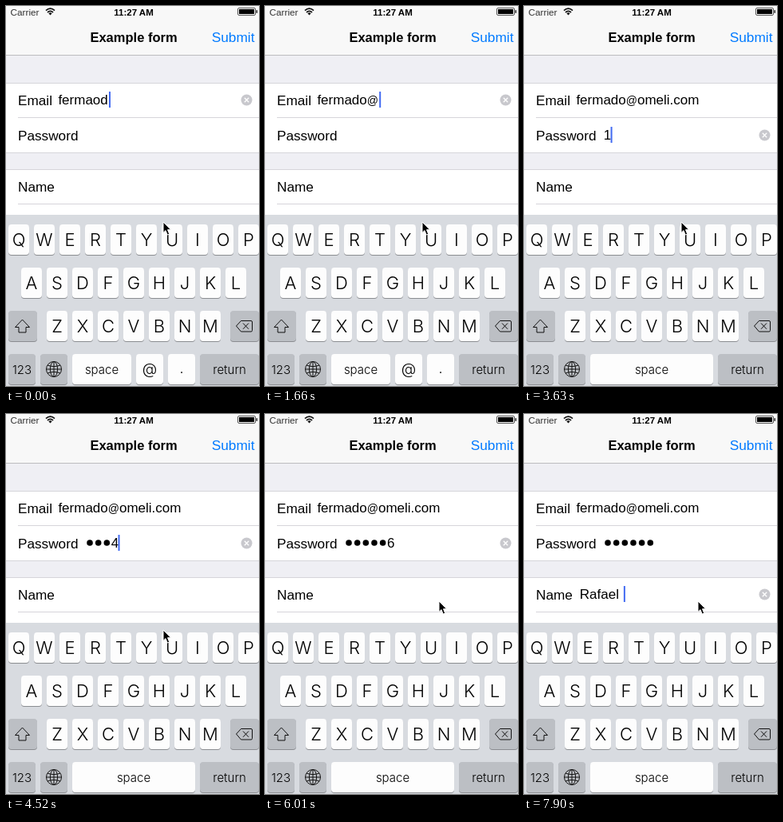
Write an HTML page that moves like this. It is 317 px wide and 475 px high and loops after 8000 ms.

```html
<!DOCTYPE html>
<html lang="en">
<head>
<meta charset="utf-8">
<title>Example form</title>
<style>
html, body { margin: 0; width: 100%; height: 100%; overflow: hidden; background: #fff; }
svg { display: block; width: 317px; height: 475px; }
text { font-family: "Liberation Sans", Arial, sans-serif; font-size: 17px; white-space: pre; }
.label { font-size: 17.2px; }
.key { font: 300 22px Inter, "Liberation Sans", sans-serif; text-anchor: middle; }
.word { font-size: 15px; }
.line { fill: none; stroke: #111; stroke-width: 1; stroke-linejoin: round; }
</style>
</head>
<body>
<svg id="stage" viewBox="0 0 317 475" xmlns="http://www.w3.org/2000/svg"></svg>
<script>
const LOOP = 8000;
const rect = (x, y, w, h, fill, rx = 0) =>
  `<rect x="${x}" y="${y}" width="${w}" height="${h}" rx="${rx}" fill="${fill}"/>`;
const text = (x, y, s, attrs = '') => `<text x="${x}" y="${y}" ${attrs}>${s}</text>`;

// Form and bars
function statusBar() {
  return text(5.5, 11.5, 'Carrier', 'style="font-size:11.8px" fill="#333"') +
    `<g fill="none" stroke="#111" stroke-width="1.7">
      <path d="M50 5.6Q55.5 .6 61 5.6M52 8Q55.5 4.8 59 8"/></g>
      <path d="M53.4 9.3Q55.5 7.4 57.6 9.3L55.5 11.6Z" fill="#111"/>` +
    text(160, 11.5, '11:27 AM', 'text-anchor="middle" font-weight="bold" style="font-size:11.5px"') +
    '<rect x="290.5" y="2.5" width="22" height="9" rx="1.5" fill="none" stroke="#555"/>' +
    rect(292, 4, 19, 6, '#000') + rect(313.5, 5, 1.5, 4, '#222', .7);
}

function form() {
  return rect(0, 0, 317, 475, '#fff') +
    rect(0, 0, 317, 61, '#f8f8f8') + rect(0, 61, 317, 1, '#bcbcc0') +
    statusBar() +
    text(160, 45, 'Example form', 'text-anchor="middle" font-weight="bold" style="font-size:16.5px"') +
    text(311.5, 45, 'Submit', 'text-anchor="end" fill="#007aff" style="font-size:17.3px"') +
    rect(0, 62, 317, 34, '#efeff4') + rect(0, 184, 317, 20, '#efeff4') +
    [96, 183, 204].map(y => rect(0, y, 317, 1, '#d6d5da')).join('') +
    [139, 247].map(y => rect(15, y, 302, 1, '#d6d5da')).join('') +
    text(15, 124, 'Email', 'class="label"') +
    text(15, 168, 'Password', 'class="label"') +
    text(15, 232, 'Name', 'class="label"');
}

// Keyboard
function key(x, y, w, label = '', dark = false) {
  const cls = label.length > 1 ? 'key word' : 'key';
  const drop = label.length > 1 ? 5.5 : 8;
  return rect(x, y + 1, w, 38, '#8b8d91', 4) +
    rect(x, y, w, 38, dark ? '#bcbfc4' : '#fdfdfd', 4) +
    text(x + w / 2, y + 19 + drop, label, `class="${cls}"`);
}
const row = (letters, x, y) => [...letters].map((c, i) => key(x + 32 * i, y, 26, c)).join('');

function keyboard() {
  return rect(0, 261, 317, 214, '#d8dbe0') +
    row('QWERTYUIOP', 3, 273) + row('ASDFGHJKL', 19, 327) + row('ZXCVBNM', 51, 381) +
    key(3, 381, 36, '', true) + key(281, 381, 36, '', true) +
    key(3, 435, 34, '123', true) + key(43, 435, 34, '', true) +
    key(243, 435, 74, 'return', true) +
    '<path id="shift" class="line" d="M20.5 392L29.5 401.5H25V408H16V401.5H11.5Z"/>' +
    `<path class="line" d="M288.5 400L294.5 393.5H307Q308.5 393.5 308.5 395V405.5Q308.5 407 307 407H294.5Z
      M297 396.5L304 403.8M304 396.5L297 403.8"/>` +
    `<g class="line" transform="translate(60 454)"><circle r="9.5"/><ellipse rx="4.6" ry="9.5"/>
      <path d="M0-9.5V9.5M-9.5 0H9.5M-8-5Q0-1.8 8-5M-8 5Q0 1.8 8 5"/></g>` +
    `<g id="mailKeys">${key(83, 435, 74, 'space')}${key(163, 435, 34, '')}${key(203, 435, 34, '')}
      ${text(180, 460, '@', 'class="key" style="font-size:19px"')}
      ${text(220, 459, '.', 'class="key" style="font-size:18px"')}</g>` +
    `<g id="plainKeys">${key(83, 435, 154, 'space')}</g>`;
}

const stage = document.getElementById('stage');
stage.innerHTML = form() +
  '<g id="values"></g>' +
  rect(0, 0, 2, 20, '#426bf2').replace('<rect', '<rect id="caret"') +
  `<g id="clear"><circle r="7" fill="#c8c8cd"/>
    <path d="M-2.7-2.7L2.7 2.7M2.7-2.7L-2.7 2.7" stroke="#fff" stroke-width="1.3"/></g>` +
  keyboard() +
  `<path id="mouse" d="M0 0V13.4L3 10.6L5.2 16L7.7 15L5.5 9.7H9.6Z" fill="#000" stroke="#fff" stroke-width="1"/>`;
const el = id => document.getElementById(id);
const [values, caret, clear, shift, mailKeys, plainKeys, mouse] =
  ['values', 'caret', 'clear', 'shift', 'mailKeys', 'plainKeys', 'mouse'].map(el);

// Fields: start of text, baseline, caret gap, moment of focus, keystrokes
const DOT = 10.65;
const fields = [
  { x: 65.4, y: 123, gap: 1.2, focus: -200, start: 'fermaod',
    keys: [[410, '<'], [500, '<'], [590, 'd'], [770, 'o'], [1660, '@'], [1950, 'o'], [2070, 'm'],
      [2240, 'e'], [2300, 'l'], [2480, 'i'], [2660, '.'], [2840, 'c'], [2890, 'o'], [3100, 'm']] },
  { x: 99.7, y: 167, gap: -.6, focus: 3210, start: '', secret: true,
    keys: [[3630, '1'], [3860, '2'], [4160, '3'], [4520, '4'], [4820, '5'], [5180, '6']] },
  { x: 69.8, y: 231, gap: 1.2, focus: 6180, start: '',
    keys: [[6940, 'R'], [7120, 'a'], [7225, 'f'], [7330, 'a'], [7435, 'e'], [7540, 'l'], [7900, ' ']] }
];
const shown = fields.map(() => {
  const g = document.createElementNS(stage.namespaceURI, 'g');
  g.innerHTML = '<g></g><text></text>';
  values.append(g);
  return { dots: g.firstChild, text: g.lastChild };
});

const mousePath = [[0, 197, 270], [5720, 195, 269], [5780, 202, 260], [5836, 220, 247],
  [5894, 232, 237], [5952, 225, 234], [6010, 218, 234]];

function typed(field, t) {
  let s = field.start, last = field.focus;
  for (const [at, c] of field.keys) {
    if (t < at) break;
    s = c === '<' ? s.slice(0, -1) : s + c;
    last = at;
  }
  return { s, last };
}

// The caret fades out in three steps after a pause in typing
const blink = idle => idle < 530 ? 1 : idle < 590 ? .66 : idle < 650 ? .33 : 0;

function drawValue(field, out, s, active) {
  const hidden = field.secret ? s.length - (active && s ? 1 : 0) : 0;
  const x = field.x + hidden * DOT;
  out.dots.innerHTML = Array.from({ length: hidden }, (_, i) =>
    `<circle cx="${field.x + DOT * (i + .5)}" cy="${field.y - 6}" r="3.8"/>`).join('');
  out.text.setAttribute('x', x);
  out.text.setAttribute('y', field.y);
  out.text.innerHTML = s.slice(hidden).replace('@', '<tspan style="font-size:14px">@</tspan>');
  return x + (s.length > hidden ? out.text.getComputedTextLength() : 0);
}

function draw(t) {
  const current = fields.filter(f => t >= f.focus).pop();
  fields.forEach((field, i) => {
    const { s, last } = typed(field, t);
    const active = field === current;
    const end = drawValue(field, shown[i], s, active);
    if (!active) return;
    caret.setAttribute('x', end + field.gap);
    caret.setAttribute('y', field.y - 16);
    caret.setAttribute('opacity', blink(t - last));
    clear.setAttribute('transform', `translate(301.5 ${field.y - 5.5})`);
    clear.style.display = s ? '' : 'none';
  });
  const upper = t >= 6180 && t < 6940;
  shift.style.fill = upper ? '#606367' : 'none';
  shift.style.stroke = upper ? '#606367' : '#111';
  mailKeys.style.display = t < 3270 ? '' : 'none';
  plainKeys.style.display = t < 3270 ? 'none' : '';
  const [, mx, my] = mousePath.filter(p => t >= p[0]).pop();
  mouse.setAttribute('transform', `translate(${mx} ${my})`);
}

const begin = performance.now();
function frame() {
  draw((performance.now() - begin) % LOOP);
  requestAnimationFrame(frame);
}
frame();
</script>
</body>
</html>
```
